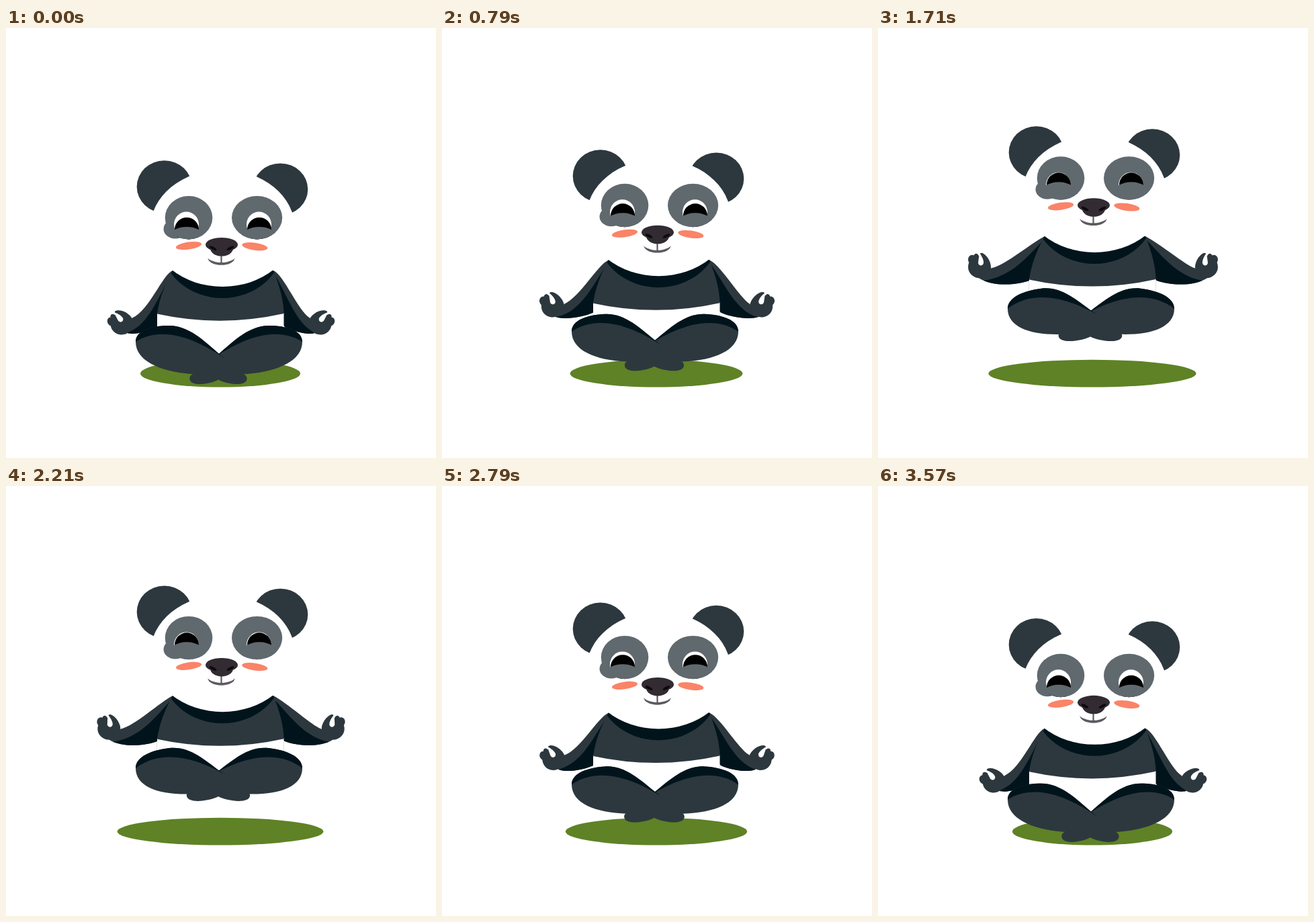
Recreate the animation shown at these times as an HTML page with a canvas. Size 640 by 640 pixels, loop 3.64 s.

```html
<!DOCTYPE html>
<html lang="en">
<head>
<meta charset="utf-8">
<title>Meditating panda</title>
<style>
  html, body { margin: 0; width: 100%; height: 100%; overflow: hidden; background: #fff; }
  canvas { display: block; width: 640px; height: 640px; }
</style>
</head>
<body>
<canvas id="stage" width="640" height="640"></canvas>
<script>
const ctx = document.getElementById('stage').getContext('2d');
const LOOP = 3640, HALF = LOOP / 2, STEPS = 51;
const WHITE = '#fff', FUR = '#2d383e', SHADE = '#01141c', PATCH = '#60696e', BLUSH = '#fa8468',
      NOSE = '#322b32', NOSTRIL = '#0d090d', MOUTH = '#5d5a60', GRASS = '#5f8226';

const clamp = v => Math.min(1, Math.max(0, v));
const mix = (a, b, k) => a + (b - a) * k;
const radians = degrees => degrees * Math.PI / 180;

// Symmetric cubic-bezier(k, 0, 1 - k, 1), solved by bisection.
function ease(x, k) {
  x = clamp(x);
  let lo = 0, hi = 1;
  for (let i = 0; i < 24; i++) {
    const s = (lo + hi) / 2, r = 1 - s;
    if (3 * k * s * r * r + 3 * (1 - k) * s * s * r + s * s * s < x) lo = s; else hi = s;
  }
  return lo * lo * (3 - 2 * lo);
}

// 0 on the ground, 1 at the top; leads shift the two halves in ms.
const lift = (t, k, leadUp, leadDown) =>
  ease((t + leadUp) / HALF, k) - ease((t - HALF + leadDown) / HALF, k);

// Each segment holds 2 (line), 4 (quadratic) or 6 (cubic) numbers.
function trace(start, ...segments) {
  ctx.beginPath();
  ctx.moveTo(...start);
  for (const s of segments) {
    if (s.length === 2) ctx.lineTo(...s);
    else if (s.length === 4) ctx.quadraticCurveTo(...s);
    else ctx.bezierCurveTo(...s);
  }
  ctx.closePath();
}

function shape(color, ...path) {
  trace(...path);
  ctx.fillStyle = color;
  ctx.fill();
}

function oval(color, x, y, rx, ry, degrees = 0) {
  ctx.beginPath();
  ctx.ellipse(x, y, rx, ry, radians(degrees), 0, Math.PI * 2);
  ctx.fillStyle = color;
  ctx.fill();
}

function saved(draw) {
  ctx.save();
  draw();
  ctx.restore();
}

const raised = (height, draw) => saved(() => {
  ctx.translate(0, -height);
  draw();
});

const mirrored = (sum, draw) => saved(() => {
  ctx.transform(-1, 0, 0, 1, sum, 0);
  draw();
});

// The origin is the gap between finger and thumb.
function drawHand() {
  oval(FUR, -2, 7, 17, 16.5);
  oval(FUR, -13, -4, 6, 7);
  oval(FUR, -7, -6, 4.5, 7);
  oval(FUR, 6, -4, 5, 11.5, -35);
  shape(WHITE, [-2, -14], [4.5, -5, 4, 1], [3, 6, -3, 6, -4, 1], [-3.5, -4, -2, -14]);
}

// Resting-body coordinates; a raises the arm, turn rotates the hand.
function drawArm(shoulder, a, turn) {
  const m = (low, high) => mix(low, high, a);
  const shift = shoulder - 248;
  const hx = m(170, 153), hy = m(433, 399.5), angle = radians(-35 * (1 - turn));
  const cos = Math.cos(angle), sin = Math.sin(angle);
  const onHand = (x, y) => [hx + x * cos - y * sin, hy + x * sin + y * cos];

  const arm = [[shoulder, 361],
    [m(232, 228) + shift, m(368, 371), m(214, 190) + shift * 1.3, m(420, 404), ...onHand(15, 9)],
    onHand(8, 14), onHand(-3, 23.5),
    [m(190, 170), m(457, 436), m(212, 205), m(452, 434), 225, m(445, 427)],
    [250, 410], [shoulder + 10, 372]];
  shape(FUR, ...arm);
  saved(() => {
    trace(...arm);
    ctx.clip();
    shape(SHADE, [shoulder - 2, 367],
      [m(226, 222) + shift, m(400, 391), m(212, 200) + shift, m(445, 421), m(178, 156), m(454, 427)],
      [150, 480], [260, 480], [260, 367]);
  });
  saved(() => {
    ctx.transform(cos, sin, -sin, cos, hx, hy);
    drawHand();
  });
}

function drawTorso() {
  ctx.fillStyle = 'rgba(1, 20, 28, .25)';
  ctx.fillRect(224.5, 424, 189.5, 20);
  ctx.fillStyle = WHITE;
  ctx.fillRect(225, 424, 188.5, 46);
  saved(() => {
    trace([248, 361], [229, 395, 225, 425.5], [319, 446, 413.5, 425], [413, 398, 398, 361]);
    ctx.clip();
    ctx.fillStyle = FUR;
    ctx.fillRect(220, 350, 200, 100);
    oval(SHADE, 322, 320, 91.5, 82);
  });
}

// Rising legs tilt: the crossed shins travel further than the knees.
function drawLeg(p) {
  const upper = [[193, 467], [193, 450, 217, 443, 243, 443], [272, 443, 295, 466, 316, 484], [326, 492]];
  saved(() => {
    ctx.transform(1, -0.122 * p, 0, 1, 0, -26 * p);
    shape(FUR, ...upper, [326, 516], [275, 515], [228, 511, 193, 495, 193, 467]);
    shape(SHADE, ...upper, [290, 467, 235, 440, 193, 467]);
  });
}

function drawFoot(p) {
  saved(() => {
    ctx.translate(316.3, -64.3 * p);
    ctx.scale(1 + 0.11 * p, 1);
    shape(FUR, [0.3, 523], [-11, 530, -42, 535, -43, 522], [-43, 513, -30, 512, 0.3, 508]);
  });
}

function drawHead() {
  oval(FUR, 235.7, 236.2, 41, 39);
  oval(FUR, 408.3, 240, 41, 38.6);
  oval(WHITE, 322.3, 298, 107.6, 87);
}

// A lid in the patch colour and the pupil rise a little more than the white.
function drawEye(x, patchX, patchRadius, p) {
  const extra = 8 * p;
  saved(() => {
    oval(PATCH, patchX, 282.2, patchRadius, 32.2);
    ctx.clip();
    oval(WHITE, x, 292.5, 18.5, 19);
    oval('#000', x + 0.5, 300 - extra, 18, 18);
    oval(PATCH, x + 0.5, 314 - extra, 28, 18);
  });
}

function drawFace(p) {
  oval(PATCH, 252, 299, 17.5, 14.5);
  drawEye(268.5, 272, 35.3, p);
  drawEye(376.5, 373.6, 37.6, p);

  oval(BLUSH, 272, 324, 19.2, 5.5, -8);
  oval(BLUSH, 370.3, 325.2, 19.2, 5.5, 8);

  oval(MOUTH, 320.5, 342, 20, 10.8);
  oval(WHITE, 320.5, 338, 22, 11);
  ctx.fillStyle = MOUTH;
  ctx.fillRect(319.4, 338, 2.2, 12);
  oval(NOSE, 321, 322.5, 24, 10.5);
  oval(NOSE, 321, 328, 17, 11.5);
  for (const side of [-1, 1]) oval(NOSTRIL, 321 + 13 * side, 327.7, 6, 2.1, -27 * side);
}

function draw(t) {
  const p = lift(t, 0.6, -24, -24);
  const arm = lift(t, 0.6, -20, 100);
  const turn = lift(t, 0.6, 150, 170);
  const spread = lift(t, 0.7, -27, -27);

  ctx.fillStyle = WHITE;
  ctx.fillRect(0, 0, 640, 640);
  oval(GRASS, 319, 514.2, mix(119, 154.7, spread), 20.4);

  raised(51.3 * p, () => {
    drawArm(248, arm, turn);
    mirrored(640, () => drawArm(242, arm, turn));
    drawTorso();
  });

  mirrored(634, () => drawLeg(p));
  drawLeg(p);
  drawFoot(p);
  mirrored(632, () => drawFoot(p));

  raised(51.3 * p, drawHead);
  raised(59 * p, () => drawFace(p));
}

const start = performance.now();
function tick() {
  const t = (performance.now() - start) % LOOP;
  const step = Math.floor((t + 3) / LOOP * STEPS) % STEPS;
  draw(step * LOOP / STEPS);
  requestAnimationFrame(tick);
}
tick();
</script>
</body>
</html>
```
